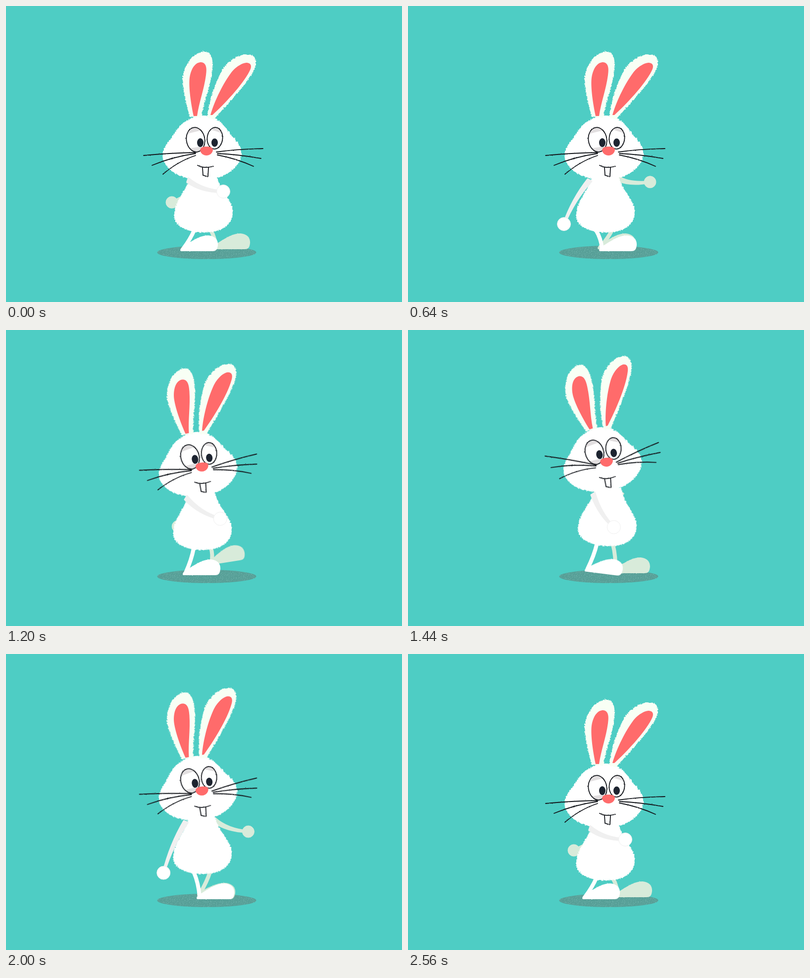
These frames come from a looping animation (800x600 px, 2600 ms). An HTML page:

```html
<!DOCTYPE html>
<html lang="en">
<head>
<meta charset="utf-8">
<title>Walking rabbit</title>
<style>
  html, body { margin: 0; width: 100%; height: 100%; overflow: hidden; background: #4ecdc4; }
  svg { display: block; width: 100%; height: 100%; }
  .ink { fill: none; stroke: #14171c; stroke-width: 1.8; stroke-linecap: round; }
  .far { fill: #d8ebda; stroke: #d8ebda; }
  .near { fill: #fff; stroke: #fff; }
  .arm { fill: #f0f0f0; stroke: #f0f0f0; }
  .limb { stroke-width: 3; stroke-linejoin: round; }
  .foot { stroke: none; }
  .ear { fill: #f8fff5; }
  .coral { fill: #ff6b6b; }
  .lid { fill: #e2dfe0; }
</style>
</head>
<body>
<svg viewBox="0 0 800 600">
  <defs>
    <filter id="fur" color-interpolation-filters="sRGB">
      <feTurbulence type="fractalNoise" baseFrequency=".36" numOctaves="2" seed="4"/>
      <feDisplacementMap in="SourceGraphic" scale="5" xChannelSelector="R" yChannelSelector="G"/>
    </filter>
    <filter id="rough" color-interpolation-filters="sRGB">
      <feTurbulence type="fractalNoise" baseFrequency=".4" numOctaves="2" seed="9"/>
      <feDisplacementMap in="SourceGraphic" scale="2" xChannelSelector="R" yChannelSelector="G"/>
    </filter>
    <filter id="speckle" color-interpolation-filters="sRGB">
      <feTurbulence type="fractalNoise" baseFrequency=".6" numOctaves="2" seed="2"/>
      <feColorMatrix values="0 0 0 0 .43  0 0 0 0 .70  0 0 0 0 .67  7 0 0 0 -3.9"/>
      <feComposite in2="SourceGraphic" operator="in" result="dots"/>
      <feMerge><feMergeNode in="SourceGraphic"/><feMergeNode in="dots"/></feMerge>
    </filter>
    <path id="foot" d="M2 0C-1-4 4-8 14-14C30-24 42-32 58-32C72-31 78-22 77-12C76-3 73 0 66 0Z"/>
    <ellipse id="eyeL" cx="383" cy="271" rx="18.5" ry="25" transform="rotate(-9 383 271)"/>
    <ellipse id="eyeR" cx="422" cy="268" rx="15.5" ry="22" transform="rotate(5 422 268)"/>
    <clipPath id="eyes"><use href="#eyeL"/><use href="#eyeR"/></clipPath>
  </defs>

  <ellipse cx="405.500" cy="499.500" rx="100" ry="13.500" fill="#579f97" filter="url(#speckle)"/>

  <path id="farArm" class="far limb"/>
  <circle id="farHand" class="far" r="12"/>
  <path id="farLeg" class="far limb"/>
  <g id="farFoot"><use href="#foot" class="far foot" filter="url(#rough)"/></g>
  <path id="nearLeg" class="near limb"/>

  <g id="torso">
    <path fill="#fff" filter="url(#fur)" d="M372 340C368 375 340 390 340 425C340 448 368 459 400 459C435 459 459 445 458 415C456 390 432 375 424 340Z"/>
  </g>
  <g id="nearFoot"><use href="#foot" class="near foot" filter="url(#rough)"/></g>

  <g id="head">
    <path fill="#fff" filter="url(#fur)" d="M400 222C425 222 440 240 455 262C470 278 476 285 475 302C473 325 445 351 400 353C352 353 318 331 317 305C316 285 330 275 340 258C355 235 375 222 400 222Z"/>
    <g id="earL">
      <path class="ear" filter="url(#fur)" d="M371 224C362 190 356 165 357 145C361 115 382 92 402 92C415 93 419 108 417 128C414 160 400 195 394 226Z"/>
      <path class="coral" d="M379 223C372 190 369 160 371 145C375 122 385 114 394 114C405 115 406 126 404 140C400 170 390 195 386 223Z"/>
    </g>
    <g id="earR">
      <path class="ear" filter="url(#fur)" d="M406 226C412 185 425 150 440 125C455 105 475 97 490 98C503 99 507 110 504 122C495 150 455 190 420 230Z"/>
      <path class="coral" d="M413 221C422 190 440 155 455 135C467 120 480 115 487 115C496 116 497 123 492 132C478 160 440 200 417 221Z"/>
    </g>
    <g clip-path="url(#eyes)">
      <path class="lid" d="M360 240H403V250L362 260ZM403 240H440V259L403 247ZM360 290L400 284V300H360Z"/>
    </g>
    <g class="ink" filter="url(#rough)"><use href="#eyeL"/><use href="#eyeR"/></g>
    <g fill="#1d2430">
      <ellipse cx="392.500" cy="277" rx="6.500" ry="9"/>
      <ellipse cx="421.500" cy="277" rx="6.500" ry="8.500"/>
    </g>
    <g class="ink" filter="url(#rough)">
      <path d="M387 323Q400 330 419 325M397 328L398 343L408 346L409 328"/>
    </g>
    <g id="whiskersL"><path class="ink" filter="url(#rough)" d="M383 297Q330 298 278 303M383 299Q335 306 295 323M383 303Q347 315 317 341"/></g>
    <g id="whiskersR"><path class="ink" filter="url(#rough)" d="M425 296Q470 290 519 289M427 299Q470 301 515 309M427 302Q465 309 500 325"/></g>
    <path class="coral" d="M392 292C393 286 399 285 405 285C412 285 418 286 418 292C417 299 411 303 405 303C399 303 393 299 392 292Z"/>
  </g>

  <path id="nearArm" class="arm limb"/>
  <circle id="nearHand" r="13.500" fill="#fff" stroke="#f0f0f0"/>
</svg>

<script>
const LOOP = 2600, CYCLE = 1280, FRAME = 40, TAU = Math.PI * 2;
const el = id => document.getElementById(id);
const set = (id, attrs) => { for (const k in attrs) el(id).setAttribute(k, attrs[k]); };
const move = (id, x, y, angle = 0, px = 0, py = 0) =>
  set(id, { transform: `translate(${x} ${y}) rotate(${angle} ${px} ${py})` });

// Step of one foot: time, heel x, lift, angle
const STEP = [
  [0, 351, 0, 0], [80, 354, -3, 6], [280, 358, -15, 9], [360, 379, -10, 0],
  [560, 377, -16, -9], [640, 385, 0, 0], [720, 384, 0, 0],
  [920, 376, 0, 0], [1200, 356, 0, 0], [1280, 351, 0, 0]
];

function stepAt(t) {
  const i = STEP.findIndex(key => key[0] > t);
  const a = STEP[i - 1], b = STEP[i], u = (t - a[0]) / (b[0] - a[0]);
  return a.map((v, k) => v + (b[k] - v) * u).slice(1);
}

// Tapered, bent limb from (ax, ay) to (bx, by)
function limb(id, ax, ay, bx, by, bendX, bendY, wa, wb) {
  const len = Math.hypot(bx - ax, by - ay) || 1;
  const nx = (ay - by) / len, ny = (bx - ax) / len, wm = (wa + wb) / 2;
  const mx = (ax + bx) / 2 + bendX, my = (ay + by) / 2 + bendY;
  const at = (x, y, w) => `${x + nx * w} ${y + ny * w}`;
  set(id, { d: `M${at(ax, ay, wa)}Q${at(mx, my, wm)} ${at(bx, by, wb)}` +
    `L${at(bx, by, -wb)}Q${at(mx, my, -wm)} ${at(ax, ay, -wa)}Z` });
}

function leg(side, t, hipX, hipY, dx, ground) {
  const [x, lift, angle] = stepAt(t), heelX = x + dx, heelY = ground + lift;
  move(side + 'Foot', heelX, heelY, angle);
  limb(side + 'Leg', hipX, hipY, heelX + 7, heelY - 5, 4, -2, 2.5, 2.5);
}

function arm(side, shoulderX, shoulderY, x, y, bendX, bendY) {
  limb(side + 'Arm', shoulderX, shoulderY, x, y, bendX, bendY, 4.5, 1.5);
  set(side + 'Hand', { cx: x, cy: y });
}

function draw(now) {
  const t = Math.floor(now % LOOP / FRAME) * FRAME % CYCLE;
  const sway = Math.sin(TAU * t / CYCLE), swing = Math.cos(TAU * t / CYCLE);

  // Double bounce: two dips in every step; ears and whiskers flop with it
  const ramp = 1 - Math.abs(1 - t % 320 / 160);
  const bob = .4 * ramp + .6 * Math.sin(ramp * Math.PI / 2);
  const rise = 21 * bob, flop = bob ** 1.8;

  move('torso', 3.3 * sway, -rise, 2.7 * sway, 400, 459);
  move('head', 14.5 * sway - 14 * bob ** 3, -26 * bob, 4.5 * sway - 10 * flop, 405, 294);
  move('earL', 0, 0, -13 * flop, 383, 225);
  move('earR', 0, 0, -13 * flop, 414, 225);
  move('whiskersL', 0, 0, 20 * flop, 383, 299);
  move('whiskersR', 0, 0, -14 * flop, 426, 299);

  leg('near', t, 380 + 2 * sway, 455 - rise, 0, 497);
  leg('far', (t + CYCLE / 2) % CYCLE, 413 + swing, 455 - rise, 31, 493);

  const lean = 9.5 * sway, q2 = swing * swing;
  arm('near', 367 + lean, 353 - rise,
    367 + 62 * swing + 10 * q2, 437 - 33 * swing - 28 * q2, -7, 3 + 8 * swing);
  arm('far', 425 + lean, 350 - rise,
    455 - 77 * swing - 43 * q2, 389 + 20.6 * swing - 11.6 * q2, -9, 9);
}

function tick(now) {
  draw(now);
  requestAnimationFrame(tick);
}
draw(0);
requestAnimationFrame(tick);
</script>
</body>
</html>
```
